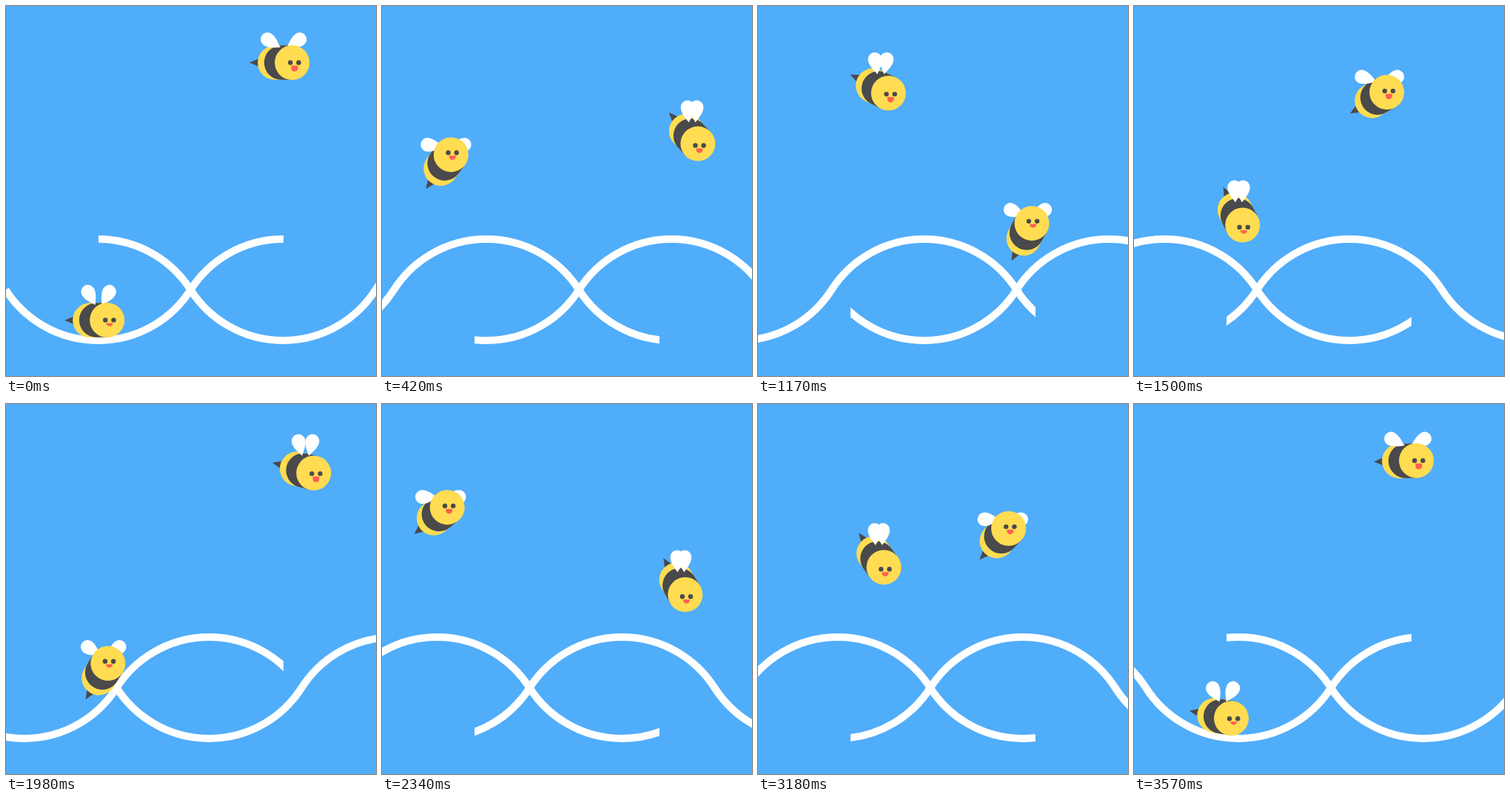
Write an HTML page that moves like this. It is 500 px wide and 500 px high and loops after 3600 ms.

```html
<!DOCTYPE html>
<html lang="en">
<head>
<meta charset="utf-8">
<title>Bees</title>
<style>
  html, body { margin: 0; width: 100%; height: 100%; overflow: hidden; background: #50adfa; }
  svg { display: block; }
  #stage { width: 100vw; height: 100vh; }
</style>
</head>
<body>
<svg id="stage" viewBox="0 0 500 500">
  <defs>
    <path id="wave" fill="none" stroke="#fff" stroke-width="10"/>
    <path id="flight" d="M0 424.5A121 121 0 0 0 102 368.7C118 343.5 136.5 311.5 150 285C229.5 128.6 329.2 76.5 500 76.5"/>
    <path id="wing" fill="#fff" d="M0 0C-4-6-9.3-13-9.3-20.5a9.3 9.3 0 0 1 18.6 0C9.3-13 4-6 0 0Z"/>
    <g id="body" stroke-width="46.6" stroke-linecap="round">
      <path fill="#4a494b" d="M-46 0L-33-5.5V5.5Z"/>
      <path stroke="#ffdc51" d="M-11.7 0H0"/>
      <path stroke="#4a494b" d="M-3 0H10"/>
    </g>
    <g id="eyes" fill="#4a494b">
      <circle cx="-5.6" r="3.2"/>
      <circle cx="5.6" r="3.2"/>
    </g>
  </defs>
  <svg width="375" height="500"><use href="#wave" class="wave" data-x="0"/></svg>
  <svg x="125" width="375" height="500"><use href="#wave" class="wave" data-x="-375"/></svg>
</svg>
<script>
const LOOP = 3600, HALF = 900, SCROLL = 500 / HALF;
const stage = document.getElementById('stage');
const flight = document.getElementById('flight');
const flightLength = flight.getTotalLength();

const arc = sweep => `a148.3 148.3 0 0 ${sweep} 250 0`;
document.getElementById('wave').setAttribute('d', 'M0 383.5' + (arc(0) + arc(1)).repeat(3));
const waves = document.querySelectorAll('.wave');

// Wing opening: [ms into the flight cycle, degrees from vertical]
const wingKeys = [
  [0, 29], [120, 47], [180, 56], [360, 78], [490, 90], [540, 88], [600, 73], [720, 52],
  [810, 51], [870, 63], [900, 58], [960, 40], [1020, 18.5], [1080, 14], [1260, 6],
  [1440, 1.5], [1500, 4], [1710, 21.5], [1770, 27], [1800, 29]
];

function wingAngle(t) {
  const i = wingKeys.findIndex(key => key[0] > t);
  const [t0, a0] = wingKeys[i - 1], [t1, a1] = wingKeys[i];
  return a0 + (a1 - a0) * (t - t0) / (t1 - t0);
}

function makeBee(x, delay) {
  const root = document.createElementNS('http://www.w3.org/2000/svg', 'g');
  root.innerHTML = `
    <use href="#body"/>
    <use href="#wing"/>
    <use href="#wing"/>
    <circle r="23.5" fill="#ffdc51"/>
    <g><use href="#eyes"/><path fill="#ff5f52"/></g>`;
  stage.append(root);
  const [body, left, right, head, face] = root.children;
  return { x, delay, root, body, left, right, head, face, mouth: face.lastChild };
}

const move = (el, x, y, turn = 0) =>
  el.setAttribute('transform', `translate(${x} ${y}) rotate(${turn})`);

function drawBee(bee, time) {
  const t = (time + bee.delay) % (2 * HALF);
  const rising = t < HALF;
  const side = rising ? 1 : -1;
  const q = rising ? t : 2 * HALF - t;

  // Constant speed along the flight path, which scrolls with the wave
  const length = q / HALF * flightLength;
  const p = flight.getPointAtLength(length);
  const a = flight.getPointAtLength(Math.max(0, length - 1));
  const b = flight.getPointAtLength(Math.min(flightLength, length + 1));
  const tilt = side * Math.atan2(b.y - a.y, b.x - a.x);
  const along = d => [d * Math.cos(tilt), d * Math.sin(tilt)];

  move(bee.root, bee.x + side * (p.x - SCROLL * q), p.y);
  move(bee.body, 0, 0, tilt * 180 / Math.PI);
  const wing = wingAngle(t);
  move(bee.left, -4.5, -20.5, -wing);
  move(bee.right, 4.5, -20.5, wing);
  move(bee.head, ...along(11.5));
  move(bee.face, ...along(14.7));

  const open = 3.7 * ((424.5 - p.y) / 348) ** 2;
  bee.mouth.setAttribute('d', `M-4.4 4H4.4v${open}a4.4 4.3 0 0 1-8.8 0Z`);
}

const bees = [makeBee(125, 0), makeBee(375, HALF)];

function draw() {
  const time = performance.now() % LOOP;
  for (const wave of waves) move(wave, +wave.dataset.x - time * SCROLL % 500, 0);
  for (const bee of bees) drawBee(bee, time);
  requestAnimationFrame(draw);
}
draw();
</script>
</body>
</html>
```
